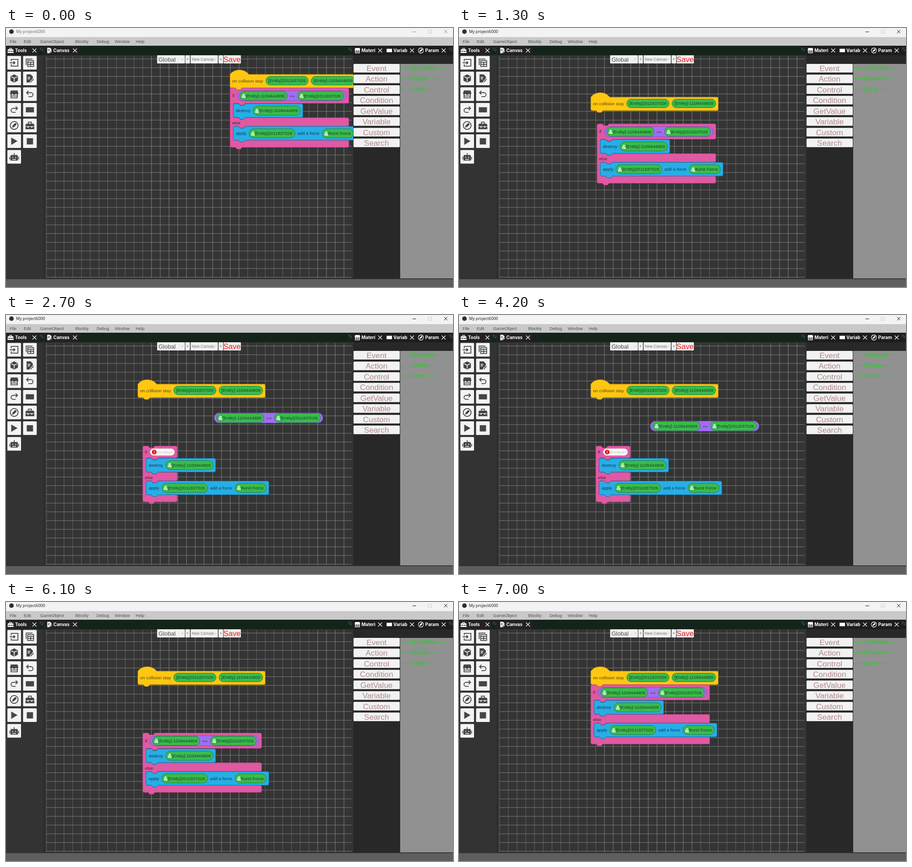
An HTML page that plays this animation: 982 by 570 pixels, repeating every 8 s.

```html
<!DOCTYPE html>
<html>
<head>
<meta charset="utf-8">
<style>
html, body { margin: 0; width: 100%; height: 100%; overflow: hidden; background: #333 }
svg { display: block; font-family: "Liberation Sans", Arial, sans-serif }
text { white-space: pre }
.ui { font-family: Inter, sans-serif; font-weight: 700 }
.title { font-family: "Open Sans", sans-serif }
</style>
</head>
<body>
<svg id="stage" width="982" height="570" viewBox="0 0 982 570">
  <clipPath id="panel"><path d="M84 60H763V552H84z"/></clipPath>
</svg>
<script>
const stage = document.getElementById('stage');

function el(parent, tag, attrs) {
  const node = document.createElementNS('http://www.w3.org/2000/svg', tag);
  for (const k in attrs) node.setAttribute(k, attrs[k]);
  return parent.appendChild(node);
}
const group = (p, x = 0, y = 0) => el(p, 'g', { transform: `translate(${x} ${y})` });
const rect = (p, x, y, width, height, fill, more) => el(p, 'rect', { x, y, width, height, fill, ...more });
const line = (p, d, stroke, width = 1) => el(p, 'path', { d, stroke, 'stroke-width': width, fill: 'none' });
// y is the middle of the capitals
function text(p, str, x, y, size, fill, more) {
  const t = el(p, 'text', { x, y: y + size * .36, 'font-size': size, fill, ...more });
  t.textContent = str;
  return t;
}
const cross = (x, y, r, color, width) =>
  line(stage, `M${x - r} ${y - r}l${2 * r} ${2 * r}m0 ${-2 * r}l${-2 * r} ${2 * r}`, color, width);

// Icons on a 24 unit grid: [filled, stroked, knocked out]
const icons = {
  enter: ['', 'M4 8V3H22V21H4V16M0 12H14M10 8l4 4-4 4'],
  tables: ['', 'M2 18V2H19M6 6H22V22H6zM6 11H22M6 16.5H22M14 11V22'],
  cube: ['M12 1l10 5v12l-10 5-10-5V6z', '', 'M4 7.5l8 4 8-4M12 12v9'],
  edit: ['M3 1h11l6 6v5l-8 8v3H3z', 'M14 22l8-8', 'M6 9h7M6 13h6'],
  shop: ['M3 2h18l2 7a3.5 3.5 0 0 1-7 1 4 4 0 0 1-8 0 3.5 3.5 0 0 1-7-1z', 'M3.5 12V22H20.5V12M4 17H20'],
  undo: ['', 'M8 3L3 8l5 5M3 8H15a5.5 5.5 0 0 1 0 11H8'],
  redo: ['', 'M16 3l5 5-5 5M21 8H9a5.5 5.5 0 0 0 0 11h7'],
  bar: ['M1 5H23V19H1z', ''],
  pencil: ['M6 18l2-6 7-7 4 4-7 7z', 'M12 1.5a10.5 10.5 0 1 0 .01 0z'],
  tools: ['M2 7h20l2 4v3H0v-3zM0 15.5h5v2h4v-2h6v2h4v-2h5V22H0z', 'M8 7V3H16V7'],
  play: ['M4 2L21 12 4 22z', ''],
  stop: ['M3.5 4H20.5V21H3.5z', ''],
  robot: ['M5 7h14a3 3 0 0 1 3 3v12H2V10a3 3 0 0 1 3-3zM-1 12h2v7h-2zM23 12h2v7h-2z', 'M12 2v5',
    'M8 12v3M16 12v3M7 19h10']
};
function icon(name, cx, cy, size, color, back) {
  const [fill, stroke, out] = icons[name], k = size / 24;
  const g = el(stage, 'g', { transform: `translate(${cx - size / 2} ${cy - size / 2}) scale(${k})` });
  el(g, 'path', { d: fill, fill: color });
  line(g, stroke, color, 2.2);
  if (out) line(g, out, back, 2);
}

// Window frame
rect(stage, 0, 0, 982, 20, '#f3f3f3');
el(stage, 'circle', { cx: 12, cy: 8, r: 5, fill: '#2b3038' });
const title = text(stage, 'My project6000', 22, 8, 8.9, '#111', { class: 'title' });
const minimize = line(stage, 'M893 8.5h8', '#111');
line(stage, 'M927.5 4.5h7v7h-7z', '#ccc');
const quit = cross(966, 8, 3.7, '#111', 1);
rect(stage, 0, 20, 982, 19, '#c9c9c9');
[['File', 8], ['Edit', 39], ['GameObject', 75], ['Blockly', 152], ['Debug', 199], ['Window', 239], ['Help', 285]]
  .forEach(([s, x]) => text(stage, s, x, 30, 9.3, '#505050'));

// Panels
rect(stage, 0, 39, 982, 21, '#14241a');
rect(stage, 0, 39, 72, 21, '#222');
rect(stage, 88, 39, 73, 21, '#222');
rect(stage, 764, 39, 218, 21, '#1d1d1d');
rect(stage, 0, 60, 84, 492, '#333');
rect(stage, 84, 60, 679, 492, '#343434');
rect(stage, 83, 39, 2, 513, '#292929');
rect(stage, 763, 60, 219, 492, '#282828');
rect(stage, 866, 79, 116, 473, '#919191');
rect(stage, 0, 552, 982, 18, '#5e5e5e');
rect(stage, 0, 551, 982, 1.5, '#2b2b2b');

[['Tools', 'tools', 10, 20, 62.5], ['Canvas', 'edit', 95.5, 104, 151.5], ['Materi', 'shop', 772, 781, 822],
 ['Variab', 'bar', 842, 851, 892], ['Param', 'pencil', 911.5, 921, 961.5]]
  .forEach(([s, name, ix, x, close]) => {
    icon(name, ix, 49.5, 13, '#fff', '#222');
    text(stage, s, x, 49.5, 9.7, '#fff', { class: 'ui' });
    cross(close, 49.5, 4.3, '#eee', 1.4);
  });
for (const x of [78, 756, 977]) line(stage, `M${x - 3} 49v-5h5M${x - 2} 45l5 5m0-4v4h-4`, '#555');

Object.keys(icons).forEach((name, i) => {
  // the grid is filled row by row
  const order = ['enter', 'tables', 'cube', 'edit', 'shop', 'undo', 'redo', 'bar', 'pencil', 'tools', 'play', 'stop', 'robot'];
  const x = 3 + i % 2 * 34.5, y = 61.5 + (i >> 1) * 34.5;
  rect(stage, x, y, 30, 30, '#f3f3f3', { rx: 1.5 });
  icon(order[i], x + 15, y + 15, 19.5, '#454545', '#f3f3f3');
});

// Canvas grid
for (let i = 0; i < 35; i++) {
  const bright = i > 11 && i < 23 || i > 30;
  rect(stage, 88.5 + i * 19.22, 62, 1, 488, bright ? '#858585' : '#676767');
}
for (let i = 0; i < 26; i++) rect(stage, 88, 67.7 + i * 19.21, 671, 1.1, '#777');

// Right panel
['Event', 'Action', 'Control', 'Condition', 'GetValue', 'Variable', 'Custom', 'Search'].forEach((s, i) => {
  const y = 79 + i * 23.45;
  rect(stage, 763.5, y, 101.5, 19, '#f2f2f2', { rx: 1.5 });
  text(stage, s, 814, y + 9.6, 17.3, '#b18a8a', { 'text-anchor': 'middle' });
});
['-----Template-----', '-----Global-----', '-----Local-----']
  .forEach((s, i) => text(stage, s, 866.5, 86.7 + i * 23.2, 13.4, '#1fd01f'));

// Blocks
const blocks = el(stage, 'g', { 'clip-path': 'url(#panel)' });
const ink = { 'fill-opacity': .66 };
const notchR = 'c3 0 2 4 5 4h6c3 0 2-4 5-4', notchL = 'c-3 0-2 4-5 4h-6c-3 0-2-4-5-4';
const topEdge = `M0 3q0-3 3-3h8${notchR}`;
const rightEdge = (w, y) => `H${w - 3}q3 0 3 3V${y - 3}q0 3-3 3`;
const bottomEdge = `H27${notchL}H3q-3 0-3-3z`;
const shape = (p, d, fill, stroke) => el(p, 'path', { d, fill, stroke, 'stroke-width': 1 });
const label = (p, s, x, y) => text(p, s, x, y, 9.63, '#000', ink);

function pill(p, x, y, w, s, ref = true, h = 20) {
  rect(p, x, y, w, h, '#3abb4d', { rx: h / 2, stroke: '#247c33' });
  if (ref) text(p, '&', x + 4, y + h / 2, 13.5, '#fff', { 'font-weight': 700 });
  label(p, s, x + (ref ? 13 : 5.5), y + h / 2);
}
function command(p, y, w, h, s) {
  const g = group(p, 7.2, y);
  shape(g, topEdge + rightEdge(w, h) + bottomEdge, '#27aee6', '#1878ad');
  label(g, s, 5.5, 15);
  return g;
}
// Branch block with two mouths; head is the height of its first row
function branch(w, head) {
  const mouth = g => `H34${notchL}H10q-3 0-3 3v${g - 6}q0 3 3 3h8${notchR}`;
  return topEdge + rightEdge(w, head) + mouth(32) + rightEdge(w, head + 50.5) +
    mouth(31) + rightEdge(w, head + 97) + bottomEdge;
}

const hat = group(blocks);
shape(hat, `M0 14V10C9-3 32-3 41 10${rightEdge(279.5, 39.5)}${bottomEdge}`, '#ffc712', '#cf9f0e');
label(hat, 'on collision stay', 4.7, 24);
pill(hat, 78.7, 14.3, 93, '[Entity]2011837026', false, 19);
pill(hat, 178.2, 14.3, 96, '[Entity]-1109444809', false, 19);

const fork = group(blocks);
const body = shape(fork, '', '#df59a3', '#bd4488');
const ifText = label(fork, 'if', 4.7, 17);
const slot = group(fork, 16.2, 5.7);
rect(slot, 0, 0, 53.5, 15, '#fff', { rx: 7.5, stroke: '#d3c3cc' });
el(slot, 'circle', { cx: 8.8, cy: 7.5, r: 5.2, fill: '#e01010' });
text(slot, '!', 8.8, 7.5, 9, '#fff', { 'font-weight': 700, 'text-anchor': 'middle' });
text(slot, 'Boolean', 14, 7.5, 9.8, '#bbb', { 'font-style': 'italic' });

const lower = group(fork);
const destroy = command(lower, 34.8, 152.5, 30, 'destroy');
pill(destroy, 43.3, 5, 104, '[Entity]-1109444809');
label(lower, 'else', 4.7, 76.7);
const apply = command(lower, 84.8, 269.5, 30, 'apply');
pill(apply, 34.3, 5, 101, '[Entity]2011837026');
label(apply, 'add a force', 140.8, 15);
pill(apply, 195.3, 5, 68.5, 'Burst Force');

const test = group(blocks);
rect(test, .5, .5, 238.5, 22, '#a06ef2', { rx: 11, stroke: '#7a4fd0' });
pill(test, 5.5, 1.5, 104, '[Entity]-1109444809');
label(test, '==', 115.3, 11.5);
pill(test, 132.7, 1.5, 101, '[Entity]2011837026');

// Bar above the canvas
[[332, 61], [394, 10], [405.5, 60], [467, 10], [478, 38]]
  .forEach(([x, w]) => rect(stage, x, 60, w, 18, '#f0f0f0', { rx: 1 }));
text(stage, 'Global', 335, 69, 13, '#505050');
text(stage, 'New Canvas', 408, 69, 8.6, '#777');
text(stage, 'Save', 477.6, 69, 16.7, '#f02020');
for (const x of [396, 469]) text(stage, '+', x, 69, 9.5, '#666');
for (const x of [388, 460.5]) line(stage, `M${x - 2} 68l2 2 2-2`, '#aaa');

// Keyframes: [time, x, y]
const hatPath = [[400, 492.3, 92.2], [700, 289.8, 142.2]];
const forkShift = [[1200, 0, 0], [1400, 27, 58], [1600, 10.8, 106.4], [6500, 10.8, 106.4], [7000, 0, 0]];
const testPath = [[2300, 316.4, 294], [2700, 457, 215], [4100, 457, 215], [4500, 309, 287], [4700, 309, 287],
  [5000, 434.5, 218.5], [5100, 457, 215], [5500, 457, 215], [5800, 212, 268], [6000, 306, 290]];

function at(keys, t) {
  const i = keys.findIndex(k => k[0] > t);
  if (i < 1) return keys[i ? keys.length - 1 : 0].slice(1);
  const [a, b] = [keys[i - 1], keys[i]], f = (t - a[0]) / (b[0] - a[0]);
  return [a[1] + (b[1] - a[1]) * f, a[2] + (b[2] - a[2]) * f];
}
const move = (node, x, y) => node.setAttribute('transform', `translate(${x} ${y})`);

function draw() {
  const t = Math.floor(performance.now() % 8000 / 100) * 100;
  const docked = t < 2400 || t >= 6100;
  const [hx, hy] = at(hatPath, t), [dx, dy] = at(forkShift, t);
  const fx = hx + dx, fy = hy + 39.8 + dy;
  move(hat, hx, hy);
  move(fork, fx, fy);
  move(test, ...(docked ? [fx + 15.7, fy + 5.6] : at(testPath, t)));

  body.setAttribute('d', docked ? branch(260.8, 33.5) : branch(75.5, 25.8));
  move(lower, 0, docked ? 0 : -7.7);
  move(ifText, 0, docked ? 0 : -4);
  slot.setAttribute('visibility', docked ? 'hidden' : 'visible');

  const color = t < 500 ? '#8a8a8a' : '#111';
  title.setAttribute('fill', t < 500 ? '#666' : '#111');
  minimize.setAttribute('stroke', color);
  quit.setAttribute('stroke', color);
  requestAnimationFrame(draw);
}
draw();
</script>
</body>
</html>
```
